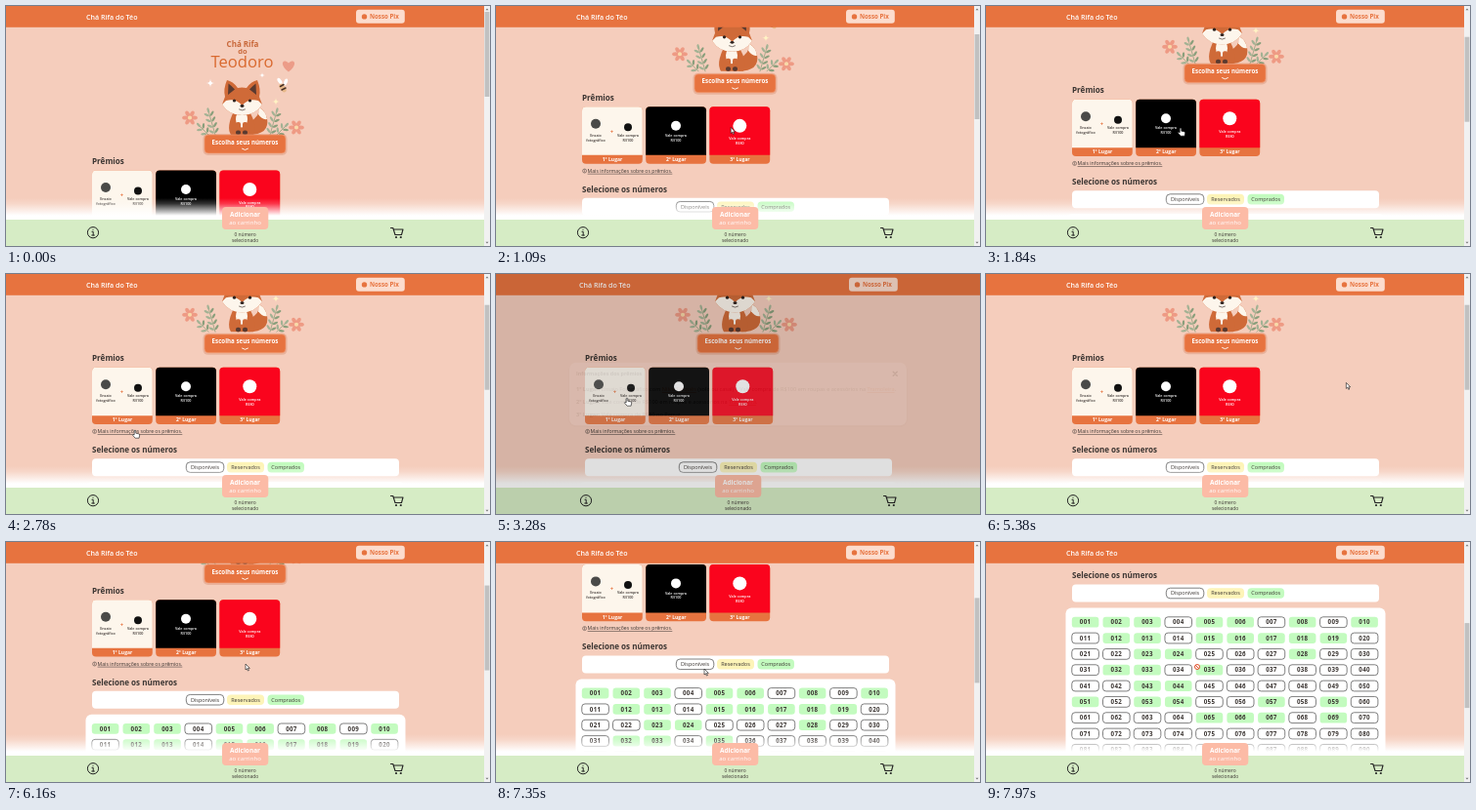
An HTML page that plays this animation: 495x246 px, repeating every 8 s.

```html
<!DOCTYPE html>
<html lang="pt-BR">
<head>
<meta charset="utf-8">
<title>Chá Rifa</title>
<style>
  html, body { margin: 0; width: 100%; height: 100%; overflow: hidden; background: #f5cdbc; }
  svg { display: block; width: 100%; height: 100%; font-family: "Open Sans", sans-serif; }
</style>
</head>
<body>
<svg id="stage" viewBox="0 0 495 246"></svg>
<script>
const LOOP = 8000;
const ORANGE = '#e7733f', INK = '#3b3532', CREAM = '#fdf6ec', GREEN = '#c3fbbf';

// Drawing helpers, all returning SVG markup
const rect = (x, y, w, h, r, fill, more = '') =>
  `<rect x="${x}" y="${y}" width="${w}" height="${h}" rx="${r}" fill="${fill}" ${more}/>`;
const circle = (x, y, r, fill, more = '') => `<circle cx="${x}" cy="${y}" r="${r}" fill="${fill}" ${more}/>`;
const oval = (x, y, rx, ry, fill, turn = 0) =>
  `<ellipse cx="${x}" cy="${y}" rx="${rx}" ry="${ry}" fill="${fill}" transform="rotate(${turn} ${x} ${y})"/>`;
const path = (d, fill, more = '') => `<path d="${d}" fill="${fill}" ${more}/>`;
const line = (d, color, width) =>
  path(d, 'none', `stroke="${color}" stroke-width="${width}" stroke-linecap="round" stroke-linejoin="round"`);
const text = (x, y, str, size, fill = INK, weight = 400, anchor = 'middle', more = '') =>
  `<text x="${x}" y="${y}" font-size="${size}" fill="${fill}" font-weight="${weight}" text-anchor="${anchor}" ${more}>${str}</text>`;
const group = (id, body, more = '') => `<g id="${id}" ${more}>${body}</g>`;
const times = (n, fn) => Array.from({ length: n }, (_, i) => fn(i)).join('');

const flower = (x, y) => times(6, i => {
  const a = i * Math.PI / 3;
  return oval(x + 4.6 * Math.cos(a), y + 4.6 * Math.sin(a), 3.2, 2, '#ee9a84', i * 60);
}) + circle(x, y, 2, '#f9d9a8');

const branch = (x, y, turn, n) => `<g transform="translate(${x} ${y}) rotate(${turn})">` +
  line(`M0 0V${-n * 6}`, '#8a9f7c', .7) +
  times(n, i => oval(-2.8, -i * 6 - 4, 2.9, 1.2, '#a3b294', 40) + oval(2.8, -i * 6 - 4, 2.9, 1.2, '#8a9f7c', -40)) +
  oval(0, -n * 6 - 2, 1.2, 2.8, '#a3b294') + '</g>';

const sparkle = (x, y, s, fill) =>
  path(`M${x} ${y - s}Q${x} ${y} ${x + s} ${y}Q${x} ${y} ${x} ${y + s}Q${x} ${y} ${x - s} ${y}Q${x} ${y} ${x} ${y - s}Z`, fill);

function fox() {
  const fur = '#cf6a38', dark = '#5a3a30';
  return path('M248 132Q270 132 267 115Q265 107 259 104Q260 113 249 119Z', fur) +
    path('M259 104Q266 108 267 116Q262 117 258 111Z', CREAM) +
    path('M233 108Q225 124 230 132H253Q257 122 249 108Z', fur) + oval(241, 116, 6, 8.5, CREAM) +
    rect(235, 119, 5, 13, 2, fur) + rect(242, 119, 5, 13, 2, fur) +
    rect(235, 127.5, 5, 4.5, 2, dark) + rect(242, 127.5, 5, 4.5, 2, dark) +
    path('M226 76Q232 77 237 84Q241 83 246 84Q251 77 257 76Q261 86 259 93L262 101Q255 112 241.5 112Q228 112 221 101L224 93Q222 85 226 76Z', fur) +
    path('M227.5 79.5Q231 82 234 85.5L227 91ZM255.5 79.5Q252 82 249 85.5L256 91Z', dark) +
    path('M221 101L225 97Q235 94 241.5 102Q248 94 258 97L262 101Q255 112 241.5 112Q228 112 221 101Z', CREAM) +
    circle(233.5, 97, 1.6, '#2b201d') + circle(249.5, 97, 1.6, '#2b201d') +
    oval(241.5, 102.5, 2, 1.4, '#2b201d') + line('M238.5 106Q241.5 108 244.5 106', '#2b201d', .6);
}

const chooseButton = () =>
  rect(201.5, 131, 86, 22, 5, '#b9552a', 'opacity=".22"') +
  rect(203, 132, 83, 19, 4, ORANGE, 'stroke="#f3a27c" stroke-width=".6"') +
  text(244.5, 141.6, 'Escolha seus números', 6.2, '#fff', 700) + line('M241.5 146.3Q244.5 148.8 247.5 146.3', '#fff', .9);

const hero = () =>
  text(242, 41.5, 'Chá Rifa', 8, '#c8683a', 700) + text(242, 49, 'do', 7.5, '#c8683a', 700) +
  text(241.5, 63.2, 'Teodoro', 16.6, '#d9692f', 500) +
  path('M289 67.5C279 60 283 53 289 58.5C295 53 299 60 289 67.5Z', '#ec9c88') +
  branch(214, 132, -16, 4) + branch(207, 132, -45, 2) + branch(270, 132, 16, 4) + branch(277, 132, 45, 2) +
  flower(188, 114.5) + flower(297, 124.5) + fox() +
  oval(280, 77, 1.8, 3.6, '#fff', -35) + oval(286, 78, 1.8, 3.6, '#fff', 20) +
  oval(283, 84, 5, 2.6, '#e8b98a', 55) + line('M280.5 82.5L284 80.5M282 86L286 84', '#4a3328', 1.5) +
  sparkle(209, 79, 4.5, '#fff') + sparkle(276, 98, 4, '#fff3c4') + sparkle(262, 71, 3, '#fff') +
  group('choose', chooseButton());

function prize(i, fill, body) {
  const x = 88 + 65.2 * i;
  return rect(x, 168.5, 61.8, 58.3, 4, ORANGE) +
    path(`M${x} 218V172.5q0-4 4-4h53.8q4 0 4 4V218Z`, fill) + body +
    text(x + 31, 224.3, `${i + 1}° Lugar`, 5, '#fff', 700);
}
const voucher = (x, y, value, fill) =>
  text(x, y, 'Vale compra', 3.7, fill, 600) + text(x, y + 4.9, value, 3.7, fill, 600);

const prizes = () => text(88, 162.2, 'Prêmios', 8.1, INK, 700, 'start') +
  prize(0, CREAM, circle(102, 186, 5, '#4a4a48') + text(102, 199, 'Ensaio', 3.7, INK, 600) +
    text(102, 203.9, 'fotográfico', 3.7, INK, 600) + text(118.5, 196, '+', 6, ORANGE, 700) +
    circle(135, 189.5, 4, '#111') + voucher(135, 199, 'R$100', INK)) +
  prize(1, '#000', circle(184, 188, 5, '#fff') + voucher(184, 199.2, 'R$100', '#fff')) +
  prize(2, '#fa041d', circle(249.3, 188, 7, '#fff') + voucher(249.3, 202.5, 'R$80', '#fff')) +
  circle(90.6, 234.2, 2, 'none', `stroke="${INK}" stroke-width=".5"`) + line('M90.6 234V235.2M90.6 233V233.1', INK, .5) +
  text(93.6, 236, 'Mais informações sobre os prêmios.', 5.15, INK, 400, 'start', 'text-decoration="underline"');

const SOLD = new Set([1, 2, 3, 5, 6, 8, 10, 12, 13, 15, 16, 17, 18, 19, 23, 24, 28, 32, 33, 35, 43, 44,
  51, 53, 54, 57, 59, 65, 66, 67, 69]);
const OUTLINE = 'stroke="#4a4a4a" stroke-width=".7"';

const pill = (x, w, label, fill, more) =>
  rect(x, 265.6, w, 10.6, 4, fill, more) + text(x + w / 2, 272.9, label, 5.5);

const numbers = () => text(88, 255.8, 'Selecione os números', 8.05, INK, 700, 'start') +
  rect(88, 262, 314, 18, 4, '#fff') +
  pill(184.3, 38.5, 'Disponíveis', '#fff', OUTLINE) + pill(226, 38, 'Reservados', '#fdf4b8') +
  pill(267.5, 37.5, 'Comprados', GREEN) +
  rect(81.5, 286, 327, 180, 6, '#fff') +
  times(100, i => {
    const x = 101.6 + 31.72 * (i % 10), y = 300.6 + 16.33 * Math.floor(i / 10), sold = SOLD.has(i + 1);
    return rect(x - 13.8, y - 5.4, 27.6, 10.8, 3.2, sold ? GREEN : '#fff', sold ? '' : OUTLINE) +
      text(x, y + 2.2, String(i + 1).padStart(3, '0'), 6.2, INK, 700, 'middle', 'letter-spacing=".3"');
  });

const header = () => rect(-20, -20, 540, 41.8, 0, ORANGE) +
  text(82, 13.6, 'Chá Rifa do Téo', 7.1, '#fff', 600, 'start') +
  rect(358, 3.8, 49.8, 14, 3, '#fcdccd') + circle(366.5, 10.9, 2.7, ORANGE) +
  text(372, 13.1, 'Nosso Pix', 6.2, ORANGE, 700, 'start');

const footer = () => rect(-20, 197, 540, 22.3, 0, 'url(#fade)') + rect(-20, 219, 540, 50, 0, '#d6ecc5') +
  circle(89, 232.2, 5.6, 'none', 'stroke="#222" stroke-width="1"') +
  line('M88 231.3H89.2V235M87.8 235H90.4M89 229.2V229.3', '#222', 1) +
  line('M393.5 227.5H395.8L398 234.5H404.5L406 229H396.4', '#222', 1.1) +
  circle(399, 237, 1.1, '#222') + circle(403.8, 237, 1.1, '#222') +
  rect(221, 206, 47.3, 23, 4, '#fcbba6') +
  text(244.5, 215.6, 'Adicionar', 6.5, '#fff', 700) + text(244.5, 223.6, 'ao carrinho', 6.1, '#fff') +
  text(244.5, 235.8, '0 número', 4.9) + text(244.5, 242.2, 'selecionado', 4.9);

const scrollbar = () => rect(489, 0, 6, 246, 0, '#f1f1f1') +
  path('M490.5 4.2L492 2.4L493.5 4.2ZM490.5 241.8L492 243.6L493.5 241.8Z', '#777') +
  group('thumb', rect(489.6, 6, 4.8, 87, 0, '#c1c1c1'));

const link = str => `<tspan fill="${ORANGE}" text-decoration="underline">${str}</tspan>`;
const place = (y, n, str) =>
  text(82, y, `<tspan font-weight="700">${n}º Lugar:</tspan> ${str}`, 5.6, INK, 400, 'start');

const modal = () => rect(74, 91, 347, 66, 8, '#000', 'opacity=".15"') + rect(75, 90.8, 345, 64.4, 7, '#fff') +
  text(82, 104.3, 'Informações dos prêmios', 5.35, INK, 700, 'start') +
  line('M406.2 100.2L410.2 104.2M410.2 100.2L406.2 104.2', '#111', 1.4) +
  place(120, 1, `Ensaio Fotográfico com ${link('Nilva Tarquês')} (solo ou casal) + Vale compra de R$100 em roupas e acessórios na ${link('Tramoleira')}.`) +
  place(133, 2, `Vale compra de R$100 em roupas e acessórios na ${link('Tramoleira')}.`) +
  place(146, 3, 'Vale compra de R$80 no Papuz.');

const POINTER = 'stroke="#111" stroke-width=".6" stroke-linejoin="round"';
const cursors = () =>
  group('arrow', path('M0 0V6L1.4 4.8L2.4 7L3.4 6.6L2.4 4.4H4.3Z', '#fff', POINTER)) +
  group('hand', path('M-.8 .6Q0-.6 .8 .6V3.2L4 3.9Q4.8 4.1 4.7 5L4.1 8.2H.1L-2.7 4.9Q-2.4 3.7-.8 4.8Z', '#fff', POINTER)) +
  group('blocked', circle(0, 0, 2.5, '#fff', 'stroke="#e2502c" stroke-width="1"') + line('M-1.7-1.7L1.7 1.7', '#e2502c', 1));

const $ = id => document.getElementById(id);
$('stage').innerHTML =
  `<defs><linearGradient id="fade" x2="0" y2="1"><stop stop-color="#fff" stop-opacity="0"/>
    <stop offset=".25" stop-color="#fff" stop-opacity=".2"/><stop offset=".8" stop-color="#fff"/></linearGradient></defs>` +
  group('view', rect(-20, -20, 540, 290, 0, '#f5cdbc') + group('page', hero() + prizes() + numbers()) + header() + footer()) +
  group('scrollbar', scrollbar()) +
  rect(0, 0, 495, 246, 0, '#000', 'id="shade"') + group('modal', modal()) + group('cursor', cursors());

// Keys are [time, ...values]; values ease between neighbouring keys
const ramp = (t, a, b) => Math.min(1, Math.max(0, (t - a) / (b - a)));
function track(keys, t) {
  const next = keys.findIndex(k => k[0] > t);
  if (next < 0) return keys.at(-1).slice(1);
  if (next === 0) return keys[0].slice(1);
  const a = keys[next - 1], b = keys[next], u = ramp(t, a[0], b[0]), e = u * u * (3 - 2 * u);
  return a.slice(1).map((v, i) => v + (b[i + 1] - v) * e);
}

const NOTCH = 36.4;
const SCROLL = [[600, 0], [800, 1], [950, 1], [1150, 2], [5700, 2], [5880, 3], [6880, 3], [7060, 4],
  [7450, 4], [7640, 6]];
const MOUSE = [[100, 500, 190], [700, 300, 150], [1250, 225, 118], [1840, 199, 125], [2150, 165, 130],
  [2700, 132, 160], [3120, 132, 160], [3280, 134, 127], [3600, 230, 116], [4350, 411, 103], [4640, 411, 103],
  [5230, 400, 108], [5700, 270, 122], [6000, 245, 125], [6250, 245, 125], [6850, 214, 130], [7400, 213, 130],
  [7650, 216, 128]];
const POINTERS = [[0, 'arrow'], [1200, 'hand'], [3400, 'arrow'], [4250, 'hand'], [4750, 'arrow'], [7600, 'blocked']];
const BOB_PERIOD = 2000, BOB_HEIGHT = 3;

function draw(t) {
  const scroll = track(SCROLL, t)[0] * NOTCH;
  const open = ramp(t, 3190, 3520) - ramp(t, 4620, 4920);
  const bob = BOB_HEIGHT * (1 - Math.cos(2 * Math.PI * t / BOB_PERIOD)) / 2;
  $('page').setAttribute('transform', `translate(0 ${-scroll})`);
  $('choose').setAttribute('transform', `translate(0 ${bob})`);
  $('thumb').setAttribute('transform', `translate(0 ${scroll * .353})`);
  $('view').setAttribute('transform', `translate(${open > 0 ? 3 : 0} 0)`);
  $('view').style.filter = open > 0 ? `blur(${open * open}px)` : 'none';
  $('scrollbar').style.display = open > 0 ? 'none' : '';
  $('shade').setAttribute('opacity', open * .45);
  $('modal').setAttribute('opacity', open * open);
  const [x, y] = track(MOUSE, t);
  $('cursor').setAttribute('transform', `translate(${x} ${y})`);
  const shape = POINTERS.findLast(p => p[0] <= t)[1];
  for (const id of ['arrow', 'hand', 'blocked']) $(id).style.display = id === shape ? '' : 'none';
}

const start = performance.now();
function tick() {
  draw((performance.now() - start) % LOOP);
  requestAnimationFrame(tick);
}
tick();
</script>
</body>
</html>
```
